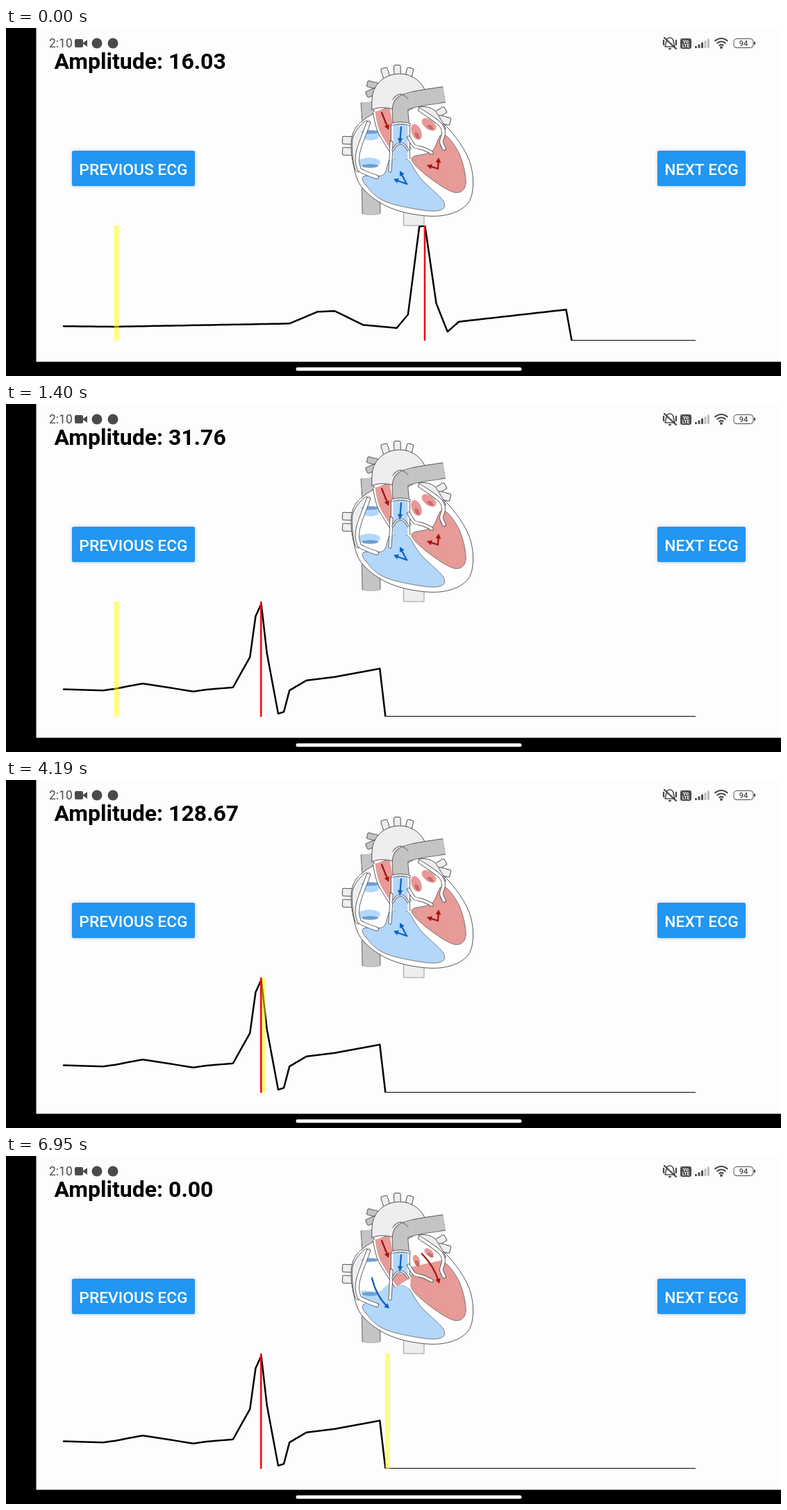
An HTML page with a canvas for the animation above (8000 ms loop, 1116 by 502 pixels).

```html
<!DOCTYPE html>
<html lang="en">
<head>
<meta charset="utf-8">
<title>ECG player</title>
<style>
html, body { margin: 0; width: 100%; height: 100%; overflow: hidden; background: #000; }
canvas { display: block; width: 100%; height: 100%; }
</style>
</head>
<body>
<canvas id="stage" width="1116" height="502"></canvas>
<script>
const ctx = document.getElementById('stage').getContext('2d');
const LOOP = 8000, SWITCH = 320, STEP_MS = 110, STEP_X = 8.13, SAMPLES = 112;
const PLOT = { left: 83, top: 285, right: 993, bottom: 451, zero: 451.2, scale: 1.267 };
const INK = '#555', DARK = '#4b4b4d', PALE = '#eeeef1', GREY = '#c4c4c4';
const BLUE = '#b3d7fa', RED = '#e79a97', DARK_BLUE = '#0b63c4', DARK_RED = '#a9120c';

// Turning points of each trace: [sample, amplitude].
const firstBeat = { peak: 64, turns: [[0, 16.6], [9, 16.03], [40, 19.6], [45, 33.1], [48, 33.9],
  [53, 18.2], [59, 14.6], [61, 30], [63, 130], [64, 131], [66, 42.6], [68, 10.3], [70, 21.7],
  [89, 35.5], [90, 0], [SAMPLES, 0]] };
const secondBeat = { peak: 35, turns: [[0, 31.28], [7, 30], [9, 31.76], [14, 37.9], [23, 28.8],
  [25, 30.79], [30, 33.5], [33, 67.9], [34, 114.4], [35, 128.67], [36, 72.6], [38, 3.6],
  [39, 5.5], [40, 30], [43, 41.4], [48, 45.34], [56, 54.9], [57, 0], [SAMPLES, 0]] };

const clamp = v => Math.max(0, Math.min(1, v));
const ease = v => { v = clamp(v); return v * v * (3 - 2 * v); };

function amplitude({ turns }, i) {
  const n = Math.max(1, turns.findIndex(turn => turn[0] >= i));
  const [x0, a0] = turns[n - 1], [x1, a1] = turns[n];
  return a0 + (a1 - a0) * (i - x0) / (x1 - x0);
}

function stroke(color, width, cap = 'round') {
  ctx.strokeStyle = color;
  ctx.lineWidth = width;
  ctx.lineCap = cap;
  ctx.stroke();
}

function paint(fill, line) {
  ctx.fillStyle = fill;
  ctx.fill();
  if (line) stroke(line, 1);
}

// Smooth curve through flat x,y pairs.
function curve(p, closed) {
  const n = p.length / 2;
  const at = i => {
    const j = closed ? (i + n) % n : Math.max(0, Math.min(n - 1, i));
    return [p[2 * j], p[2 * j + 1]];
  };
  ctx.beginPath();
  ctx.moveTo(p[0], p[1]);
  for (let i = 0; i < (closed ? n : n - 1); i++) {
    const [a, b, c, d] = [at(i - 1), at(i), at(i + 1), at(i + 2)];
    ctx.bezierCurveTo(b[0] + (c[0] - a[0]) / 6, b[1] + (c[1] - a[1]) / 6,
      c[0] - (d[0] - b[0]) / 6, c[1] - (d[1] - b[1]) / 6, c[0], c[1]);
  }
}

function blob(p, fill, line) {
  curve(p, true);
  paint(fill, line);
}

function poly(p, fill) {
  ctx.beginPath();
  for (let i = 0; i < p.length; i += 2) ctx.lineTo(p[i], p[i + 1]);
  ctx.closePath();
  paint(fill);
}

function oval(x, y, rx, ry, turn, fill) {
  ctx.beginPath();
  ctx.ellipse(x, y, rx, ry, turn, 0, 7);
  paint(fill);
}

function box(x, y, w, h, r, fill, line) {
  ctx.beginPath();
  ctx.roundRect(x, y, w, h, r);
  paint(fill, line);
}

function tube(p, width, color = '#fff', cap = 'round') {
  curve(p);
  stroke(INK, width + 1.8, cap);
  stroke(color, width, cap);
}

// A blood-filled vessel with white walls.
function pipe(p, width, color) {
  tube(p, width + 5, '#fff', 'butt');
  stroke(color, width, 'butt');
}

function stub(x, y, length, width, turn, fill = PALE) {
  ctx.save();
  ctx.translate(x, y);
  ctx.rotate(turn);
  box(-length / 2, -width / 2, length, width, 2, fill, INK);
  ctx.restore();
}

function arrow(x0, y0, x, y, color, bend = 0, head = true) {
  const cx = (x0 + x) / 2 + (y0 - y) * bend, cy = (y0 + y) / 2 + (x - x0) * bend;
  const a = Math.atan2(y - cy, x - cx);
  ctx.beginPath();
  ctx.moveTo(x0, y0);
  ctx.quadraticCurveTo(cx, cy, x - (head ? 3 : 0) * Math.cos(a), y - (head ? 3 : 0) * Math.sin(a));
  stroke(color, 2.3);
  if (!head) return;
  const wing = s => [x - 8 * Math.cos(a + s), y - 8 * Math.sin(a + s)];
  poly([x, y, ...wing(0.5), ...wing(-0.5)], color);
}

function backVessels() {
  tube([520, 107, 523, 150], 17, GREY, 'butt');
  tube([525, 190, 526, 268], 25, GREY, 'butt');
  oval(526, 268, 12.5, 2, 0, GREY);
  box(573, 262, 29, 23, 0, PALE, '#999');
  for (const y of [162, 178]) stub(493, y, 17, 11, 0.05);
  stub(625, 122, 18, 10, -0.55);
  stub(631, 133, 18, 11, 0.25);
  stub(528, 82, 16, 9, 0.25, GREY);
  stub(527, 93, 17, 9, -0.4, GREY);
}

// The muscle contracts towards its upper left edge.
function muscle(squeeze) {
  ctx.save();
  ctx.translate(497, 130);
  ctx.scale(1 - 0.075 * squeeze, 1 - 0.045 * squeeze);
  ctx.translate(-497, -130);
  blob([513,134, 498,158, 500,197, 515,233, 560,262, 625,271, 667,250, 669,197, 637,145, 590,112, 550,115], '#fff', INK);
  blob([515,214, 519,228, 548,251, 614,264, 631,252, 597,217, 578,190, 554,188, 543,212], BLUE, '#777');
  blob([584,188, 613,178, 629,153, 653,182, 662,225, 645,237, 606,213], RED, '#777');
  ctx.restore();
}

function filledAtria(valvesOpen) {
  oval(530, 171, 27, 36, 0, BLUE);
  oval(608, 147, 25, 28, 0, RED);
  if (valvesOpen) {
    poly([510,200, 555,184, 567,201, 543,230, 526,222], BLUE);
    poly([588,160, 630,145, 640,172, 612,205, 597,197], RED);
    poly([557,216, 558,200, 576,191, 581,199], '#fff');
    poly([585,190, 606,179, 617,179, 594,196], '#fff');
  }
  for (const y of [150, 200]) oval(523, y, 12, 2.5, 0, '#7891ac');
  oval(593, 152, 4, 7, -0.5, '#cc7470');
  oval(609, 132, 9, 4, 0.4, '#cc7470');
  tube([513,208, 522,209, 536,218], 4);
  tube([626,132, 633,151, 630,172], 4);
}

function emptyAtria(filling) {
  blob([515,136, 499,160, 502,202, 511,205, 506,182, 521,140], PALE, INK);
  blob([594,114, 616,118, 633,145, 626,141, 610,126], PALE, INK);
  if (filling) {
    poly([511,194, 538,196, 555,180, 579,190, 552,217, 517,214], BLUE);
    poly([584,160, 606,155, 630,150, 632,182, 596,195, 582,188], RED);
  } else {
    oval(526, 155, 13, 7, -0.1, BLUE);
    oval(523, 194, 16, 7, 0, BLUE);
  }
  for (const y of [150, 199]) oval(524, y, 12, 2.7, 0, '#6d9ed2');
  const size = filling ? 0.65 : 1;
  oval(591, 150, 7 * size, 12 * size, -0.4, RED);
  oval(609, 139, 12 * size, 7 * size, 0.65, RED);
  oval(592, 155, 3, 5, -0.5, '#cc6b66');
  oval(611, 143, 5, 2.5, 0.65, '#cc6b66');
  tube([522,137, 507,179, 508,202, 518,209, 534,215], 4.5);
  tube([596,118, 624,138, 630,151, 627,164, 631,174], 4);
}

function greatVessels(open) {
  pipe([542,118, 549,146, 572,182], 22, RED);
  for (const side of [-1, 0, 1]) stub(563.5 + 17 * side, 62 + 4 * Math.abs(side), 17, 9.5, 1.55 + 0.28 * side);
  ctx.beginPath();
  ctx.ellipse(566.5, 103, 39.5, 37, 0, Math.PI, 0);
  ctx.lineTo(575, 122);
  ctx.quadraticCurveTo(541, 110, 527, 118);
  ctx.closePath();
  paint(PALE, INK);
  pipe([568,138, 568,open ? 189 : 170], 21, BLUE);
  tube([555,165, 554,190, 553,206], 3.2);
  tube([580,158, 588,170, 601,174, 613,180], 3.5);
  for (const side of [-1, 1]) tube([568 + 11 * side,176, 568 + 6 * side,169, 568,166], 1.5);
  tube([569,138, 569,112, 588,103, 631,96], 22, GREY, 'butt');
  tube([556,139, 568,137, 581,139], 2);
  curve([557,103, 563,97, 571,96, 579,102]);
  stroke('#888', 1.5);
}

function bloodFlow(phase) {
  arrow(541, 122, 551, 147, DARK_RED);
  arrow(569, 143, 567, 166, DARK_BLUE);
  if (phase === 'eject') {
    arrow(577, 225, 558, 218, DARK_BLUE);
    arrow(577, 225, 567, 206, DARK_BLUE);
    arrow(622, 203, 606, 198, DARK_RED);
    arrow(622, 203, 623, 187, DARK_RED);
  } else if (phase === 'fill') {
    arrow(526, 151, 570, 234, DARK_BLUE, 0.18);
    arrow(521, 200, 536, 188, DARK_BLUE, -0.35, false);
    for (const [x, y] of [[605, 128], [585, 144], [619, 139]]) arrow(x, y, 607, 153, DARK_RED, 0, false);
    arrow(607, 153, 632, 200, DARK_RED, -0.08);
  } else {
    arrow(527, 176, 552, 220, DARK_BLUE, 0.15);
    arrow(599, 141, 624, 184, DARK_RED, -0.12);
  }
}

function heart(time) {
  const t = Math.floor(time / 40) * 40 + 30;
  const squeeze = ease((t - 4680) / 760) - ease((t - 5700) / 1200);
  const phase = t < 5440 ? 'eject' : t < 6400 ? 'fill' : 'refill';
  backVessels();
  muscle(squeeze);
  if (t > 5050 && t < 6400) filledAtria(phase === 'fill');
  else emptyAtria(phase === 'refill');
  greatVessels(phase === 'eject');
  bloodFlow(phase);
}

function text(value, x, y, font, color, align = 'left') {
  ctx.font = font + ' Roboto, sans-serif';
  ctx.textAlign = align;
  ctx.fillStyle = color;
  ctx.fillText(value, x, y);
}

function button(label, x, width, press = 0) {
  ctx.save();
  ctx.shadowColor = 'rgba(0,0,0,.22)';
  ctx.shadowBlur = 5;
  ctx.shadowOffsetY = 0.5;
  box(x, 177, width, 51, 2.5, '#2196f3');
  ctx.restore();
  if (press > 0) {
    const glow = ctx.createRadialGradient(155, 202, 4, 155, 202, 40);
    glow.addColorStop(0, `rgba(20,65,105,${0.6 * press})`);
    glow.addColorStop(0.5, `rgba(20,65,105,${0.42 * press})`);
    glow.addColorStop(1, 'rgba(20,65,105,0)');
    box(x, 177, width, 51, 2.5, glow);
  }
  text(label, x + width / 2, 211.5, '500 22.8px', '#fff', 'center');
}

function statusBar() {
  text('2:10', 62, 28, '17.5px', DARK);
  box(99, 16, 12, 12, 2, DARK);
  poly([110, 22, 117, 17, 117, 27], DARK);
  for (const x of [131, 154]) oval(x, 22, 7.5, 7.5, 0, DARK);

  ctx.beginPath();
  ctx.arc(956, 19, 5, Math.PI, 0);
  ctx.lineTo(963, 27);
  ctx.lineTo(949, 27);
  ctx.closePath();
  stroke(DARK, 1.6);
  oval(956, 30, 2.2, 1.3, 0, DARK);
  arrow(948, 14, 965, 30, DARK, 0, false);
  for (const x of [947, 965]) arrow(x, 18, x, 24, DARK, 0, false);

  box(971, 15, 16, 15, 3, DARK);
  text('Vo', 979, 21.5, 'bold 7px', '#fff', 'center');
  text('LTE', 979, 28, 'bold 6.5px', '#fff', 'center');
  for (let i = 0; i < 5; i++) box(992 + i * 4.5, 26 - i * 2.6, 3, 3 + i * 2.6, 1, i < 3 ? DARK : '#bcbcbf');
  for (let r = 4; r <= 13; r += 4.5) {
    ctx.beginPath();
    ctx.arc(1030, 28, r, -2.3, -0.84);
    stroke(DARK, 2.2);
  }
  oval(1030, 28, 2, 2, 0, DARK);
  box(1048, 15.5, 28, 13, 4, 'transparent', DARK);
  box(1077, 19.5, 2, 5, 1, DARK);
  text('94', 1062, 26, '500 11px', DARK, 'center');
}

function plot(beat, index) {
  const { left, top, right, bottom, zero, scale } = PLOT;
  const height = bottom - top;
  ctx.save();
  ctx.beginPath();
  ctx.rect(left - 1, top, right - left + 1, height);
  ctx.clip();
  ctx.beginPath();
  for (let i = 0; i <= SAMPLES; i++) ctx.lineTo(left + i * STEP_X, zero - amplitude(beat, i) * scale);
  stroke('#000', 2.5);
  ctx.fillStyle = 'rgba(255,255,0,.5)';
  ctx.fillRect(Math.max(84.3, 82.5 + index * STEP_X), top, 7, height);
  ctx.fillStyle = '#f00c10';
  ctx.fillRect(left - 1.6 + beat.peak * STEP_X, top, 2.6, height);
  ctx.restore();
}

function draw() {
  const t = performance.now() % LOOP;
  const before = t < SWITCH;
  const beat = before ? firstBeat : secondBeat;
  const index = before ? 9 + Math.floor((t + 70) / STEP_MS)
    : Math.min(57, Math.floor((t - SWITCH) / STEP_MS));
  const press = before ? clamp((t - 180) / 120) : 1 - clamp((t - 380) / 250);

  ctx.lineJoin = 'round';
  ctx.fillStyle = '#000';
  ctx.fillRect(0, 0, 1116, 502);
  ctx.fillStyle = '#fdfcff';
  ctx.fillRect(43.5, 0, 1072.5, 481.5);
  box(417.5, 489.5, 325, 5, 2.5, '#fff');
  statusBar();
  heart(t);
  text('Amplitude: ' + amplitude(beat, index).toFixed(2), 69.5, 59, 'bold 32px', '#000');
  button('PREVIOUS ECG', 95, 177, press);
  button('NEXT ECG', 938, 127);
  plot(beat, index);
  requestAnimationFrame(draw);
}
draw();
</script>
</body>
</html>
```
